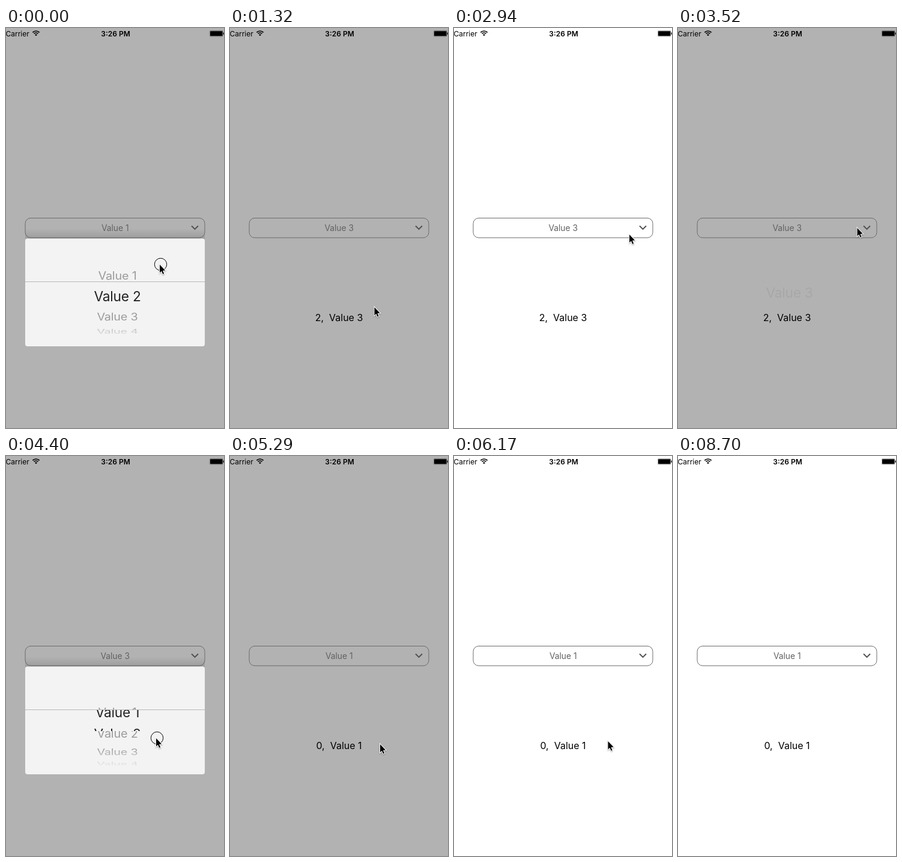
Animation of 363 by 666 pixels, one loop 8.85 s. Source, as an HTML page with a canvas:

```html
<!DOCTYPE html>
<html lang="en">
<head>
<meta charset="utf-8">
<title>Dropdown picker</title>
<style>
  html, body { margin: 0; width: 100%; height: 100%; overflow: hidden; background: #fff; }
  canvas { display: block; width: 363px; height: 666px; }
</style>
</head>
<body>
<canvas id="stage" width="363" height="666"></canvas>
<script>
const ctx = document.getElementById('stage').getContext('2d');
const W = 363, H = 666, LOOP = 8850, STEP = 147, LAST = 59;
const FONT = 'Inter, Roboto, sans-serif';
const PANEL = { x: 32, y: 350.5, w: 299, h: 179.5 };
const WHEEL = { x: 185.5, y: 440.5, radius: 77, angle: 0.46, top: 422, bottom: 458 };

const within = (n, from, to) => n >= from && n <= to;
const ramp = (n, from, to) => Math.min(1, Math.max(0, (n - from) / (to - from)));
const easeOut = k => 1 - (1 - k) ** 2;

// Each drag moves the wheel, which then snaps to the nearest row.
const wheelPosition = n =>
  0.816 + 0.184 * ramp(n, 0, 1) + easeOut(ramp(n, 4, 8))
  - 1.617 * ramp(n, 27, 30) - 0.383 * easeOut(ramp(n, 31, 34));

const dimming = n => 0.3 * (1 - ramp(n, 9, 11) + ramp(n, 22, 24) - ramp(n, 36, 38));

function cursorPosition(n) {
  let x = 255.5, y = 393;
  const move = (from, to, dx, dy) => {
    const k = ramp(n, from, to);
    x += dx * k;
    y += dy * k;
  };
  move(0, 1, 0, -12);     // finish the first drag
  move(1, 4, -9, 129);
  move(4, 7, -6.5, -46);  // drag to the third row
  move(9, 11, 0, -34);
  move(12, 21, 58, -98);  // to the field
  move(25, 27, -45, 81);
  move(27, 30, -3.5, 56); // drag back to the first row
  move(31, 34, 0, 10);
  move(37, 39, 5, -5);
  move(41, 42, 1.5, 0);
  move(52, 59, 125, 216); // leave the stage
  return [x, y];
}

// y is the middle of the capital letters.
function text(str, x, y, size, { color = '#000', weight = 400, align = 'center', spacing = 0 } = {}) {
  ctx.font = `${weight} ${size}px ${FONT}`;
  ctx.letterSpacing = spacing + 'px';
  ctx.textAlign = align;
  ctx.fillStyle = color;
  ctx.fillText(str, x, y + size * 0.364);
}

function roundRect(x, y, w, h, r) {
  ctx.beginPath();
  ctx.roundRect(x, y, w, h, r);
}

function polyline(points) {
  ctx.beginPath();
  points.forEach(([x, y]) => ctx.lineTo(x, y));
}

function clipped(y0, y1, draw) {
  ctx.save();
  ctx.beginPath();
  ctx.rect(PANEL.x, y0, PANEL.w, y1 - y0);
  ctx.clip();
  draw();
  ctx.restore();
}

function verticalFade(from, to, rgb, alpha) {
  const fade = ctx.createLinearGradient(0, from, 0, to);
  fade.addColorStop(0, `rgba(${rgb},0)`);
  fade.addColorStop(1, `rgba(${rgb},${alpha})`);
  ctx.fillStyle = fade;
  ctx.fillRect(PANEL.x, Math.min(from, to), PANEL.w, Math.abs(to - from));
}

function statusBar() {
  text('Carrier', -0.5, 9.3, 12, { align: 'left' });
  text('3:26 PM', 182.5, 9.3, 12, { weight: 600 });
  ctx.strokeStyle = ctx.fillStyle = '#000';
  ctx.lineWidth = 1.7;
  for (const r of [8, 5]) {
    ctx.beginPath();
    ctx.arc(50, 13, r, -Math.PI * 0.75, -Math.PI * 0.25);
    ctx.stroke();
  }
  ctx.beginPath();
  ctx.moveTo(50, 13.3);
  ctx.arc(50, 13.3, 2.8, -Math.PI * 0.75, -Math.PI * 0.25);
  ctx.fill();

  roundRect(340, 5.3, 20.5, 7.9, 0.8);
  ctx.fill();
  ctx.fillRect(361.6, 7.6, 1.2, 3.2);
  ctx.strokeStyle = 'rgba(0,0,0,0.5)';
  ctx.lineWidth = 0.6;
  roundRect(339.2, 4.5, 22, 9.5, 1.5);
  ctx.stroke();
}

function field(value) {
  ctx.strokeStyle = '#6c6c6c';
  ctx.lineWidth = 1;
  roundRect(32, 316.5, 299, 32.7, 9);
  ctx.stroke();
  text(value, 181.7, 332.8, 13.8, { color: '#626262' });
  ctx.strokeStyle = '#505050';
  ctx.lineWidth = 1.9;
  polyline([[309, 329.5], [314.5, 335], [320, 329.5]]);
  ctx.stroke();
}

const wheelText = (str, x, y, size, color) => text(str, x, y, size, { color, spacing: -size * 0.01 });

function wheelRows(position, size, color) {
  for (let i = 0; i < 5; i++) {
    const theta = (i - position) * WHEEL.angle;
    if (Math.abs(theta) > 1.45) continue;
    ctx.save();
    ctx.translate(WHEEL.x, WHEEL.y + WHEEL.radius * Math.sin(theta));
    ctx.scale(1, Math.cos(theta));
    wheelText(`Value ${i + 1}`, 0, 0, size, color);
    ctx.restore();
  }
}

function picker(position) {
  verticalFade(334, 351, '0,0,0', 0.12);
  ctx.fillStyle = '#f3f3f3';
  roundRect(PANEL.x, PANEL.y, PANEL.w, PANEL.h, 4);
  ctx.fill();

  const grey = () => wheelRows(position, 19.8, 'rgba(0,0,0,0.36)');
  clipped(PANEL.y, WHEEL.top, grey);
  clipped(WHEEL.bottom, PANEL.y + PANEL.h, grey);
  clipped(WHEEL.top, WHEEL.bottom, () => wheelRows(position, 22.7, '#222'));
  verticalFade(396, 361, '243,243,243', 1);
  verticalFade(485, 520, '243,243,243', 1);
  ctx.fillStyle = '#b9b9b9';
  ctx.fillRect(PANEL.x, WHEEL.top, PANEL.w, 1);
}

function cursor([x, y], pressed) {
  ctx.save();
  ctx.translate(x, y);
  if (pressed) {
    ctx.strokeStyle = '#000';
    ctx.lineWidth = 1;
    ctx.beginPath();
    ctx.arc(2, 0.5, 10.2, 0, Math.PI * 2);
    ctx.stroke();
  }
  polyline([[0.5, 1], [0.5, 14.4], [3.4, 11.7], [5.7, 16.8], [7.6, 16], [5.5, 10.9], [9.6, 10.5]]);
  ctx.closePath();
  ctx.shadowColor = 'rgba(0,0,0,0.35)';
  ctx.shadowBlur = 2;
  ctx.shadowOffsetY = 1;
  ctx.strokeStyle = '#fff';
  ctx.lineWidth = 2;
  ctx.stroke();
  ctx.shadowColor = 'transparent';
  ctx.fillStyle = '#000';
  ctx.fill();
  ctx.restore();
}

function draw(ms) {
  // The picture advances in even steps and holds each one.
  const n = Math.min(LAST, Math.floor((ms + 10) / STEP));
  const selected = within(n, 9, 35) ? 2 : 0;
  const value = `Value ${selected + 1}`;

  ctx.fillStyle = '#fff';
  ctx.fillRect(0, 0, W, H);
  ctx.fillStyle = `rgba(0,0,0,${dimming(n)})`;
  ctx.fillRect(0, 0, W, H);
  field(value);
  statusBar();
  text(`${selected},  ${value}`, 181.5, 482.5, 16);

  if (n <= 8 || within(n, 25, 35)) picker(wheelPosition(n));
  if (n === 24) wheelText(value, WHEEL.x, WHEEL.y + 0.5, 22.7, 'rgba(0,0,0,0.06)');

  const pressed = n <= 1 || within(n, 4, 6) || n === 22 || within(n, 27, 32);
  cursor(cursorPosition(n), pressed);
}

function tick() {
  draw(performance.now() % LOOP);
  requestAnimationFrame(tick);
}
tick();
</script>
</body>
</html>
```
